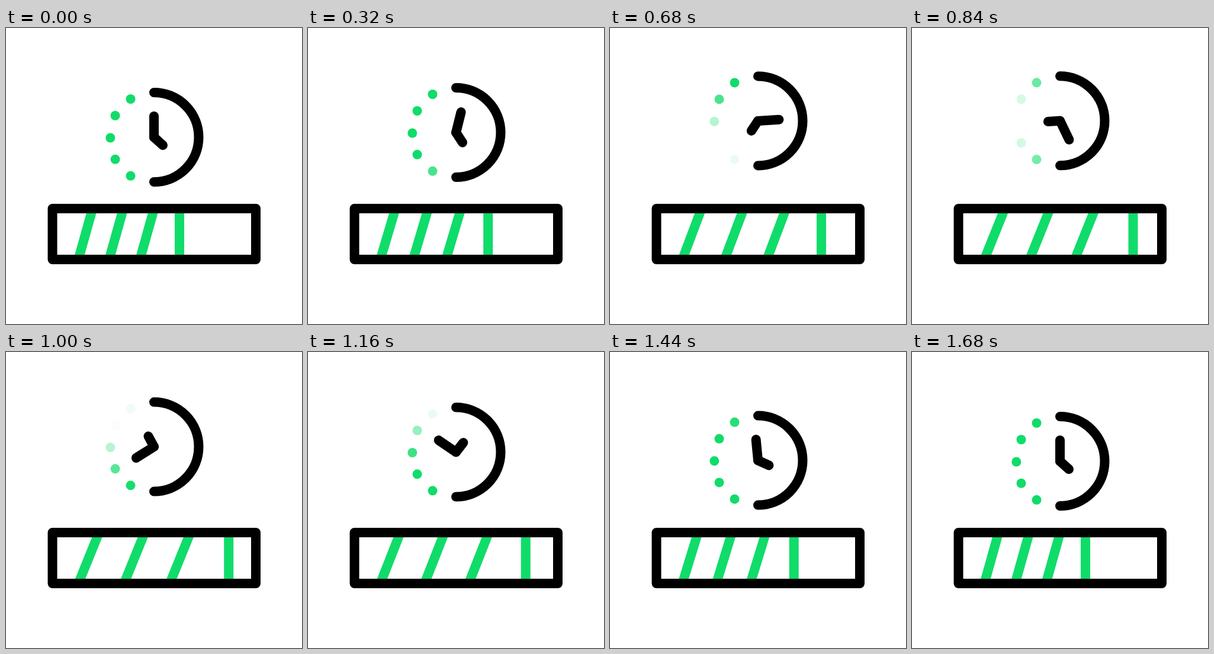
An HTML page for the animation above (1.72 s loop, 500 by 500 pixels).

```html
<!DOCTYPE html>
<html lang="en">
<head>
<meta charset="utf-8">
<title>Loading</title>
<style>
  html, body { margin: 0; width: 100%; height: 100%; overflow: hidden; background: #fff; }
  svg { display: block; width: 100vw; height: 100vh; fill: none; stroke-width: 16; }
  .ink { stroke: #000; stroke-linecap: round; stroke-linejoin: round; }
  .stripe { stroke: #10dc6a; }
  .dot { fill: #10dc6a; }
</style>
</head>
<body>
<svg viewBox="0 0 500 500">
  <g id="stripes"></g>
  <rect class="ink" x="78.5" y="305" width="343.5" height="86"/>
  <g id="clock">
    <g id="dots"></g>
    <path class="ink" d="M0-75.5A75.5 75.5 0 0 1 0 75.5"/>
    <path class="ink" id="long" d="M0 0V-35.5"/>
    <path class="ink" id="short" d="M0 0L15 13.5"/>
  </g>
</svg>
<script>
const LOOP = 1720, STEP = 40;
const $ = id => document.getElementById(id);

function add(parent, tag, attrs) {
  const el = document.createElementNS('http://www.w3.org/2000/svg', tag);
  for (const k in attrs) el.setAttribute(k, attrs[k]);
  return parent.appendChild(el);
}

const smooth = u => u * u * (3 - 2 * u);
const ramp = (t, a, b) => Math.min(1, Math.max(0, (t - a) / (b - a)));

// Eased progress from a to b, as cubic-bezier(p, 0, q, 1)
function ease(t, a, b, p, q) {
  const x = ramp(t, a, b);
  let lo = 0, hi = 1;
  for (let i = 0; i < 24; i++) {
    const u = (lo + hi) / 2, v = 1 - u;
    if (3 * v * v * u * p + 3 * v * u * u * q + u * u * u < x) lo = u; else hi = u;
  }
  return smooth((lo + hi) / 2);
}

const stripes = [0, 1, 2, 3].map(() =>
  add($('stripes'), 'line', { class: 'stripe', y1: 305, y2: 391 }));

// Bottom to top, the order in which they blink
const dots = [[-39.5, 65.3], [-65.5, 37.3], [-73.7, 1], [-65.5, -36.5], [-39.5, -64.5]]
  .map(([cx, cy]) => add($('dots'), 'circle', { class: 'dot', cx, cy, r: 8 }));

function setStripe(el, top, bottom) {
  el.setAttribute('x1', top);
  el.setAttribute('x2', bottom);
}

function draw(t) {
  const lift = 28 * (ease(t, 0, 760, .6, .46) - ease(t, 760, 1600, .55, .45));
  $('clock').setAttribute('transform', `translate(250 ${184.5 - lift})`);
  $('long').setAttribute('transform', `rotate(${360 * ease(t, 0, 1600, .65, .5)})`);
  $('short').setAttribute('transform', `rotate(${360 * ease(t, 0, 1680, .58, .6)})`);

  const dx = 83.5 * (ease(t, 0, 960, .61, .59) - ease(t, 960, 1680, .58, .48));
  stripes.forEach((el, i) => {
    if (i === 3) return setStripe(el, 293 + dx, 293 + dx);
    const x = 122.2 + i * (52 + .303 * dx);
    setStripe(el, x + 24.1 + .13 * dx, x);
  });

  dots.forEach((el, i) => {
    const s = t - 120 * i;
    el.setAttribute('opacity', 1 - smooth(ramp(s, 200, 580)) + smooth(ramp(s, 600, 1040)));
  });
}

let start;
function tick(now) {
  start ??= now;
  draw(Math.floor((now - start) % LOOP / STEP) * STEP);
  requestAnimationFrame(tick);
}
draw(0);
requestAnimationFrame(tick);
</script>
</body>
</html>
```
